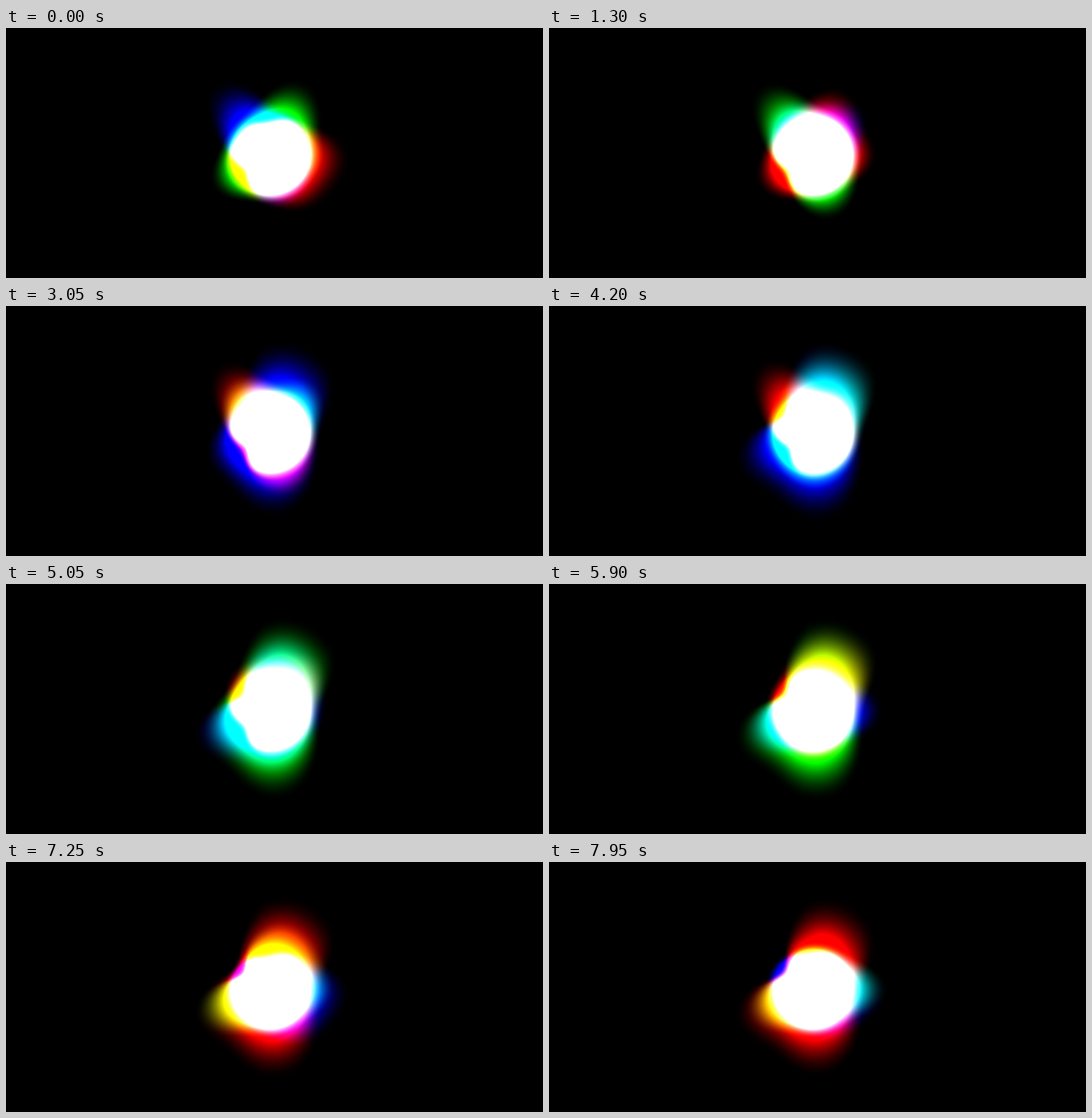
Animation, 600 px wide and 279 px high, one loop 8000 ms. Source, as an HTML page with a canvas:

```html
<!DOCTYPE html>
<html lang="en">
<head>
<meta charset="utf-8">
<title>Colour glow</title>
<style>
  html, body { margin: 0; width: 100%; height: 100%; overflow: hidden; background: #000; }
  canvas { display: block; width: 600px; height: 279px; }
</style>
</head>
<body>
<canvas id="stage" width="600" height="279"></canvas>
<script>
const LOOP = 8000, STEP = 50;
const CX = 295, CY = 142;
const BOX = { x: 190, y: 30, w: 206, h: 218 };
const BINS = 720;

// One outline breathes in a slow cycle; green and red repeat blue's motion later.
const CYCLE = 10.8;
const DELAY = { red: CYCLE / 3, green: CYCLE / 6, blue: 0 };
const RADIUS = 48;

// A bulge (or dent) at an angle, clockwise from the right, around one moment.
const lobe = (angle, width, height, at, span) => ({ angle, width, height, at, span });
const LOBES = [
  lobe(232, 28, 25, 0.1, 1.6),
  lobe(148, 28, -15, 0.6, 2),
  lobe(315, 28, 17, 3.1, 3.2),
  lobe(278, 32, 27, 3.6, 2.6),
  lobe(85, 45, 25, 3.8, 1.7),
  lobe(158, 30, 19, 4.7, 2.6),
  lobe(210, 25, -12, 5.4, 2.4),
  lobe(0, 28, 16, 7, 2.4),
  lobe(262, 32, -10, 7.2, 1.2),
  lobe(45, 35, 12, 7.3, 1),
  lobe(150, 28, 10, 8.9, 1),
  lobe(295, 32, 19, 9, 1),
  lobe(70, 35, 11, 10.2, 0.8)
];

const ctx = document.getElementById("stage").getContext("2d");
const image = ctx.createImageData(BOX.w, BOX.h);
const clamp = (v, lo, hi) => Math.min(hi, Math.max(lo, v));
// Signed shortest way round a circle of the given length.
const wrap = (d, length) => d - length * Math.round(d / length);

// Polar position of every pixel in the box.
const count = BOX.w * BOX.h;
const bin = new Uint16Array(count);
const dist = new Float32Array(count);
for (let i = 0; i < count; i++) {
  const dx = BOX.x + i % BOX.w + 0.5 - CX;
  const dy = BOX.y + Math.floor(i / BOX.w) + 0.5 - CY;
  const turn = Math.atan2(dy, dx) / (2 * Math.PI);
  bin[i] = Math.floor((turn + 1) * BINS) % BINS;
  dist[i] = Math.hypot(dx, dy);
  image.data[i * 4 + 3] = 255;
}

function swell(l, phase) {
  const c = Math.min(1, Math.abs(wrap(phase - l.at, CYCLE)) / l.span);
  return l.height * (1 - c ** 3) ** 2;
}

function outline(phase) {
  const active = LOBES.map(l => ({ ...l, height: swell(l, phase) })).filter(l => l.height);
  const inner = new Float32Array(BINS), outer = new Float32Array(BINS);
  for (let b = 0; b < BINS; b++) {
    const a = b * 360 / BINS;
    const r = active.reduce(
      (sum, l) => sum + l.height * Math.exp(-((wrap(a - l.angle, 360) / l.width) ** 2)), RADIUS);
    // The further the light reaches, the softer its rim.
    const soft = clamp((r - 41) * 0.95, 5, 29);
    inner[b] = r - soft * 0.5;
    outer[b] = r + soft;
  }
  return { inner, outer };
}

function draw(t) {
  const px = image.data;
  [DELAY.red, DELAY.green, DELAY.blue].forEach((delay, c) => {
    const { inner, outer } = outline(t / 1000 - delay);
    for (let i = 0; i < count; i++) {
      const b = bin[i];
      const f = clamp((outer[b] - dist[i]) / (outer[b] - inner[b]), 0, 1);
      px[i * 4 + c] = 255 * f * f;
    }
  });
  ctx.putImageData(image, BOX.x, BOX.y);
}

ctx.fillRect(0, 0, 600, 279);
const start = performance.now();
let last = -1;
function tick() {
  const t = Math.floor((performance.now() - start) % LOOP / STEP) * STEP;
  if (t !== last) draw(last = t);
  requestAnimationFrame(tick);
}
tick();
</script>
</body>
</html>
```
